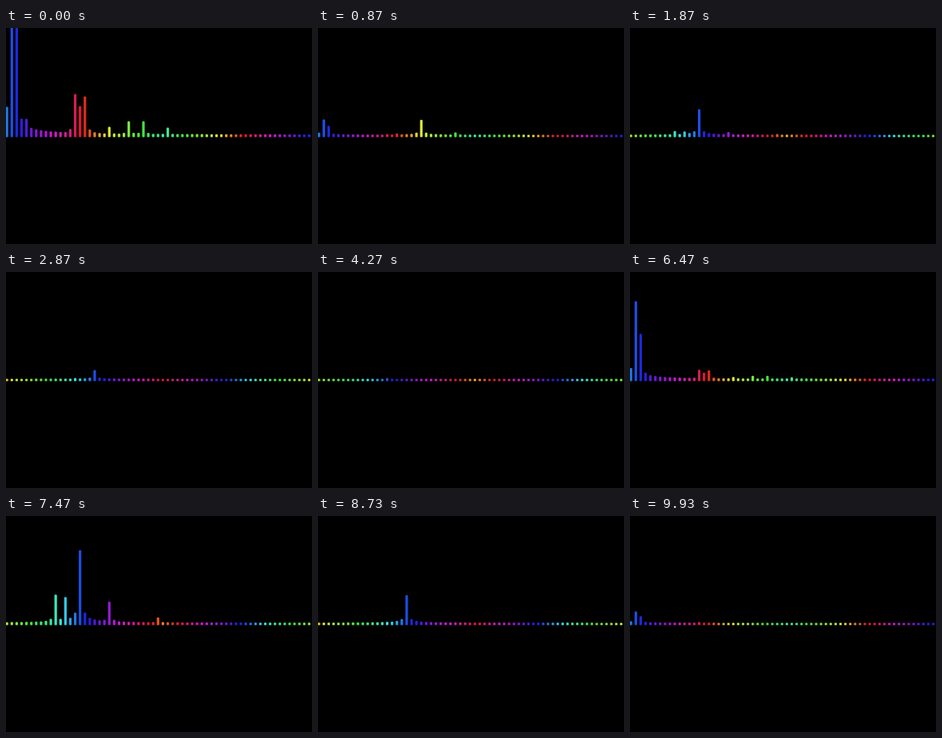
An HTML page with a canvas for the animation above (9.99 s loop, 383 px wide and 270 px high).

```html
<!DOCTYPE html>
<html lang="en">
<head>
<meta charset="utf-8">
<title>Spectrum</title>
<style>
  html, body { margin: 0; width: 100%; height: 100%; overflow: hidden; background: #000; }
  canvas { display: block; }
</style>
</head>
<body>
<canvas id="stage" width="383" height="270"></canvas>
<script>
const ctx = document.getElementById('stage').getContext('2d');
const LOOP = 9990, RATE = 15, BARS = 63, CENTRE = 32, MEASURE = 3.007;
const PITCH = 6.1, BASE = 133.5, LEAK = 0.14;

// A hit: onset and life in seconds, and its tones as { bar: height }
const hits = [];
const hit = (at, life, tones) => hits.push({ at, life, tones: Object.entries(tones) });

for (let k = 0; k < 4; k++) {
  const start = k * MEASURE;
  hit(start, 1.2, { 1: 250, 2: 145 });
  hit(start, 0.85, { 0: 33, 4: 20, 14: 51, 15: 36, 16: 48, 21: 10, 25: 17, 28: 17, 33: 9 });
  if (k === 3) break;

  hit(start + 0.75, 0.5, { 16: 3, 21: 32, 28: 5 });

  const root = k < 2 ? 14 : 15;
  const gain = k < 2 ? 0.83 : 1;
  hit(start + 1.445, 1.2, { [root]: 92 * gain });
  hit(start + 1.445, 0.7, { [root - 5]: 36 * gain, [root - 3]: 33 * gain, [root + 6]: 27 * gain, [root + 16]: 7 * gain });

  hit(start + 2.303, 0.5, { 31: 1.5, 33: 3, 34: 2.5 });
  hit(start + 2.35, 0.71, { 18: 150 });
}

// Every tone leaks into the bars around it, weaker with distance
const spread = distance => distance ? LEAK / distance : 1;

function levels(t) {
  const out = new Array(BARS).fill(0);
  out[14] = 1; // steady hum
  for (const { at, life, tones } of hits) {
    const age = t - at;
    if (age < 0 || age >= life) continue;
    const fade = (1 - age / life) ** 2;
    for (const [bar, height] of tones) {
      for (let i = 0; i < BARS; i++) {
        out[i] = Math.max(out[i], height * fade * spread(Math.abs(i - bar)));
      }
    }
  }
  return out;
}

const wave = degrees => Math.cos(degrees * Math.PI / 180);

// The loudest bar is always blue; hues mirror around the centre bar
function colour(i, loudest) {
  const turn = Math.abs(loudest - CENTRE) - Math.abs(i - CENTRE);
  const angle = 220 + turn * 9.8;
  const hue = angle + 7 * wave(2 * (angle - 60));
  return `hsl(${hue}, 78%, ${52 + 6 * wave(hue - 120)}%)`;
}

function draw() {
  const ms = performance.now() % LOOP;
  const t = Math.floor(ms / 1000 * RATE + 0.1) / RATE;
  const bars = levels(t);
  const loudest = bars.indexOf(Math.max(...bars));
  ctx.fillStyle = '#000';
  ctx.fillRect(0, 0, 383, 270);
  bars.forEach((h, i) => {
    ctx.fillStyle = colour(i, loudest);
    ctx.beginPath();
    ctx.roundRect(i * PITCH - 0.4, BASE - h, 3.2, h + 3, 1.3);
    ctx.fill();
  });
  requestAnimationFrame(draw);
}
draw();
</script>
</body>
</html>
```
